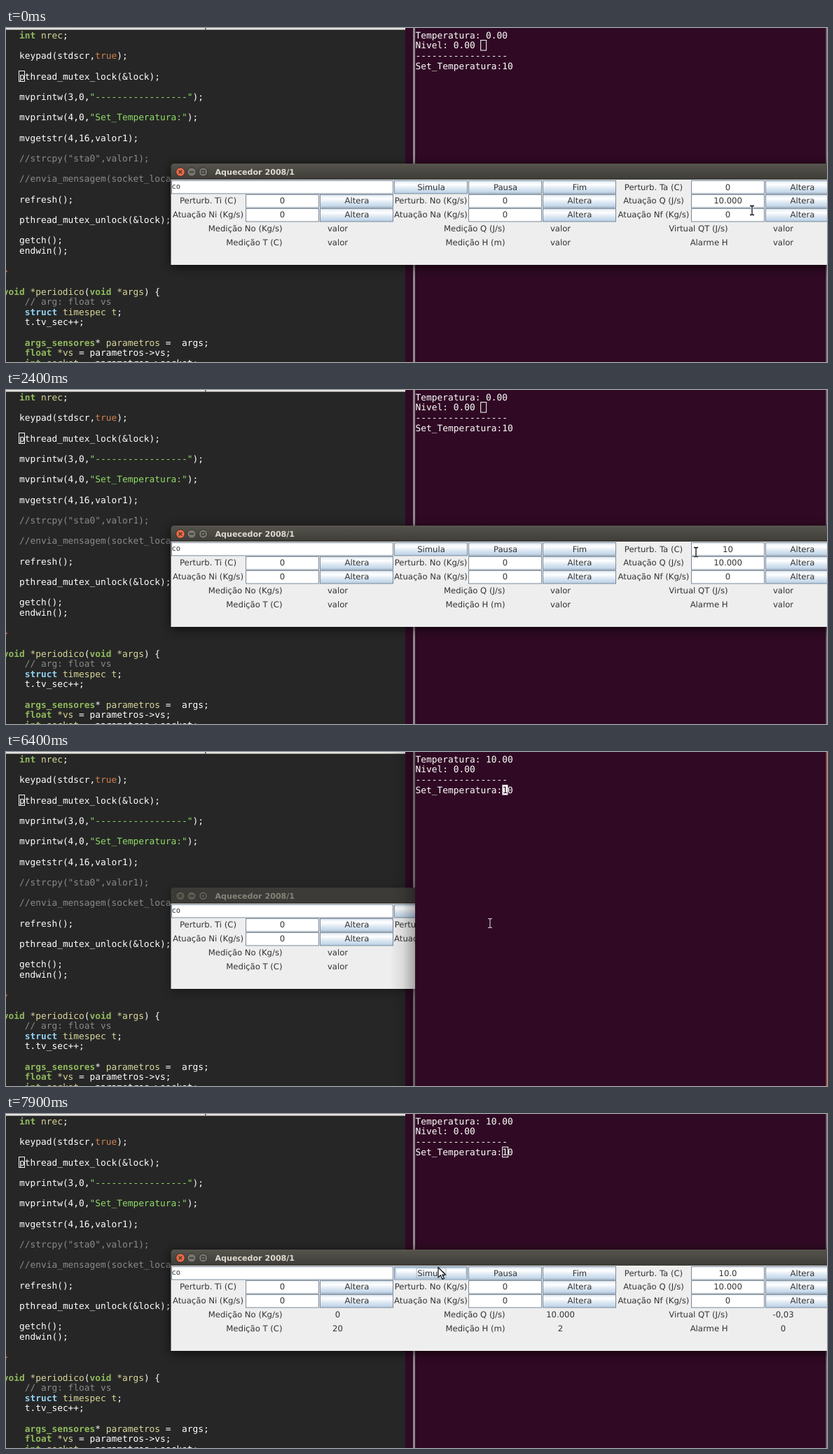
Write an HTML page that moves like this. It is 1172 px wide and 478 px high and loops after 8 s.

```html
<!DOCTYPE html>
<html lang="pt">
<head>
<meta charset="utf-8">
<style>
html, body { margin: 0; width: 100%; height: 100%; overflow: hidden; background: #300a24; }
svg { display: block; width: 1172px; height: 478px; }
text { white-space: pre; text-rendering: geometricPrecision; }
.mono { font: 12.85px "DejaVu Sans Mono", monospace; fill: #fff; }
.ui { font: 11.65px "DejaVu Sans", sans-serif; fill: #333; }
.title { font: bold 11.1px "DejaVu Sans", sans-serif; }
.k { fill: #8fb95c; font-weight: bold; }
.s { fill: #8fdc68; }
.c { fill: #8a8a8a; }
.o { fill: #cf8050; }
.y { fill: #d9d79a; }
.b { fill: #8fd0f0; font-weight: bold; }
</style>
</head>
<body>
<svg id="stage" viewBox="0 0 1172 478"></svg>
<script>
const LOOP = 8000, CHAR = 7.74, LINE = 14.66, COL = 106, ROW = 19.85;
const stage = document.getElementById('stage');

const rect = (x, y, w, h, fill, more = '') =>
  `<rect x="${x}" y="${y}" width="${w}" height="${h}" fill="${fill}" ${more}/>`;
const text = (x, y, s, cls = 'ui', more = '') => `<text x="${x}" y="${y}" class="${cls}" ${more}>${s}</text>`;
const outline = c => `stroke="${c}" stroke-width="1"`;

// line, column, code; {class|token} colours a token
const code = [
  [0, 3, '{k|int} {y|nrec};'],
  [2, 3, 'keypad(stdscr,{o|true});'],
  [4, 3, 'pthread_mutex_lock(&amp;lock);'],
  [6, 3, 'mvprintw(3,0,{s|"-----------------"});'],
  [8, 3, 'mvprintw(4,0,{s|"Set_Temperatura:"});'],
  [10, 3, 'mvgetstr(4,16,valor1);'],
  [12, 3, '{c|//strcpy("sta0",valor1);}'],
  [14, 3, '{c|//envia_mensagem(socket_local,}'],
  [16, 3, 'refresh();'],
  [18, 3, 'pthread_mutex_unlock(&amp;lock);'],
  [20, 3, 'getch();'],
  [21, 3, 'endwin();'],
  [23, 0, '{o|}}'],
  [25, 0, '{k|void} {y|*periodico}({k|void} {y|*args}) {'],
  [26, 4, '{c|// arg: float vs}'],
  [27, 4, '{b|struct} {y|timespec t};'],
  [28, 4, 't.tv_sec++;'],
  [30, 4, '{k|args_sensores}* {y|parametros} =  args;'],
  [31, 4, '{k|float} {y|*vs} = parametros->vs;'],
  [32, 4, '{k|int} {y|socket} = parametros->socket;']
];
const tint = s => s.replace(/\{(\w)\|(\}|[^}]*)\}/g, '<tspan class="$1">$2</tspan>');

const defs = `<defs>
  <linearGradient id="btn" x2="0" y2="1"><stop stop-color="#dde8f3"/><stop offset=".3" stop-color="#fff"/>
    <stop offset=".6" stop-color="#dde8f3"/><stop offset="1" stop-color="#b8cfe5"/></linearGradient>
  <linearGradient id="bar" x2="0" y2="1"><stop stop-color="#56544c"/><stop offset="1" stop-color="#3c3b37"/></linearGradient>
  <linearGradient id="shade"><stop stop-opacity="0"/><stop offset=".5" stop-opacity=".08"/>
    <stop offset="1" stop-opacity=".3"/></linearGradient>
  <filter id="blur" x="-20%" y="-50%" width="140%" height="200%"><feGaussianBlur stdDeviation="8"/></filter>
  <clipPath id="left"><path d="M0 0H584V478H0Z"/></clipPath></defs>`;

const editor = rect(0, 0, 570, 478, '#262626') + rect(0, 0, 570, 2.5, '#e6e4e0') + rect(284, 0, 1.5, 2.5, '#555') +
  code.map(([n, col, s]) => text((-4.2 + col * CHAR).toFixed(2), 15 + n * LINE, tint(s), 'mono')).join('') +
  rect(18.5, 61.5, 8, 15, 'none', outline('#f4f4f0'));

// time, x, y, shape: each position holds until the next one
const pointer = [
  [0, 1065, 261, 'beam'], [200, 1075, 256, 'beam'], [300, 1104, 246, 'arrow'], [400, 1128, 235, 'arrow'],
  [500, 1130, 231, 'arrow'], [600, 1124, 230, 'arrow'], [700, 1096, 229, 'arrow'], [800, 1069, 228, 'beam'],
  [900, 1053, 229, 'beam'], [1000, 1045, 230, 'beam'], [1100, 1015, 231, 'beam'], [1200, 985, 232, 'beam'],
  [4100, 891, 136, 'light'], [5000, 0, 0, ''], [5800, 913, 134, 'light'], [6000, 712, 249, 'light'],
  [6200, 695, 254, 'light'], [6400, 691, 245, 'light'], [6700, 617, 308, 'light'], [6900, 576, 325, 'arrow'],
  [7200, 561, 268, 'arrow'], [7400, 560, 240, 'arrow'], [7500, 559.5, 225.7, 'arrow'], [7900, 616.5, 219, 'arrow']
];
const beam = 'M-3 -6.5H-1L0 -5.5L1 -6.5H3M0 -5.5V5.5M-3 6.5H-1L0 5.5L1 6.5H3';
const shapes = {
  '': '',
  beam: `<path d="${beam}" fill="none" stroke="#fff" stroke-width="3"/><path d="${beam}" fill="none" stroke="#111" stroke-width="1.3"/>`,
  light: `<path d="${beam}" fill="none" stroke="#d5cdd2" stroke-width="1.1"/>`,
  arrow: '<path d="M.5 .5V15L4 11.8L6.5 17.4L8.9 16.3L6.5 11H11Z" fill="#fff" stroke="#111" stroke-width="1.2"/>'
};
function drawPointer(t) {
  const [, x, y, shape] = pointer.findLast(p => p[0] <= t);
  return `<g transform="translate(${x} ${y})">${shapes[shape]}</g>`;
}

const between = (t, a, b) => t >= a && t < b;
const colX = c => 236 + c * COL;
const rowY = r => Math.round(218 + r * ROW);
const baseline = r => 231.6 + r * ROW;
const middle = (x, r, s) => text(x, baseline(r), s, 'ui', 'text-anchor="middle"');
const label = (c, r, s) => middle(colX(c) + 52.5, r, s);
const field = (c, r, s, span = 1) =>
  rect(colX(c) + .5, rowY(r) + .5, span * COL - 2, 18.5, '#fff', outline('#7a8a99')) + label(c, r, s);

function button(c, r, s, { hover, pressed, focus } = {}) {
  const x = colX(c), y = rowY(r), half = s === 'Altera' ? 18 : 21;
  return rect(x + .5, y + .5, COL - 2, 18.5, pressed ? '#b8cfe5' : 'url(#btn)', outline('#7a8a99')) +
    (hover ? rect(x + 2, y + 2, COL - 5, 15.5, 'none', 'stroke="#b8cfe5" stroke-width="2"') : '') +
    (focus ? rect(x + 53 - half, y + 2.5, half * 2, 14.5, 'none', outline('#a3b8cc')) : '') +
    middle(x + 53, r, s);
}

function ambient(t) {
  if (t < 500) return '0';
  if (t < 1700) return '0.0';
  if (t < 1800) return '1';
  return t < 7700 ? '10' : '10.0';
}

function titleBar(active) {
  const line = active ? '#33322e' : '#2f2e2a', disc = active ? '#77756d' : '#5b5952';
  const circle = (x, fill) => `<circle cx="${x}" cy="206" r="6.3" fill="${fill}" ${outline('#2f2e2a')}/>`;
  return `<path d="M235.5 218V199Q235.5 194 240.5 194H1172V218Z" fill="${active ? 'url(#bar)' : '#3c3b37'}"/>` +
    circle(249, active ? '#ec6a45' : disc) + circle(265, disc) + circle(281.5, disc) +
    `<path d="M246.7 203.7L251.3 208.3M251.3 203.7L246.7 208.3M262 206H268M279.3 203.8H283.7V208.2H279.3Z" fill="none" stroke="${line}" stroke-width="1.3"/>` +
    text(298.5, 210.2, 'Aquecedor 2008/1', 'title', `fill="${active ? '#dfdbd2' : '#85827a'}"`);
}

function dialog(t, active) {
  const run = t >= 7700;
  const value = s => run ? s : 'valor';
  let out = rect(236, 198, 960, 143, '#000', `filter="url(#blur)" opacity="${active ? .75 : .4}"`) +
    titleBar(active) + rect(235.5, 217, 937, 122, '#eee');

  out += field(0, 0, '', 3) + text(236.6, 230, 'co', 'ui', 'style="font:10.4px DejaVu Sans Mono,monospace"');
  if (between(t, 200, 500)) out += rect(249, 221, 1, 14, '#333');
  out += button(3, 0, 'Simula', { hover: run, focus: run }) + button(4, 0, 'Pausa') + button(5, 0, 'Fim');
  out += label(6, 0, 'Perturb. Ta (C)') + field(7, 0, '');
  if (between(t, 1100, 1700)) out += rect(1020, 221, 20, 15, '#b8cfe5');
  out += label(7, 0, ambient(t));
  if (between(t, 1800, 2200) || between(t, 2300, 2400)) out += rect(1037, 221, 1, 15, '#333');
  out += button(8, 0, 'Altera', {
    hover: between(t, 300, 800), pressed: between(t, 500, 600), focus: between(t, 500, 1100)
  });

  [['Perturb. Ti (C)', 'Perturb. No (Kg/s)', 'Atuação Q (J/s)'],
   ['Atuação Ni (Kg/s)', 'Atuação Na (Kg/s)', 'Atuação Nf (Kg/s)']].forEach((names, r) =>
    names.forEach((s, i) => {
      out += label(i * 3, r + 1, s) + field(i * 3 + 1, r + 1, s.includes('Q') ? '10.000' : '0') +
        button(i * 3 + 2, r + 1, 'Altera');
    }));

  [[['Medição No (Kg/s)', '0'], ['Medição Q (J/s)', '10.000'], ['Virtual QT (J/s)', t < 7900 ? '10.000' : '-0,03']],
   [['Medição T (C)', '20'], ['Medição H (m)', '2'], ['Alarme H', '0']]].forEach((cells, r) =>
    cells.forEach(([s, v], i) => {
      const x = colX(i * 3) + 158.5;
      out += text(x, baseline(r + 3), s, 'ui', 'text-anchor="end"') + middle(x + 79, r + 3, value(v));
    }));
  return active ? out : `<g clip-path="url(#left)">${out}</g>`;
}

function terminal(t, focused) {
  const moved = t >= 5000;
  const x = 584.6 + (moved ? 16 : 12) * CHAR, y = moved ? 47.2 : 17.5;
  const lit = between(t, 4100, 4600) || between(t, 5000, 5600) || between(t, 6200, 6700) || between(t, 7400, 7700);
  const line = (n, s) => text(584.6, 14.6 + n * LINE, s, 'mono');
  let out = line(0, `Temperatura: ${t < 4100 ? '0.00' : '10.00'}`) + line(1, 'Nivel: 0.00') +
    line(2, '-'.repeat(17)) + line(3, 'Set_Temperatura:10');
  if (!focused) out += rect(x + .2, y, 8, 14.5, 'none', outline('#fff'));
  else if (lit) {
    out += rect(x, y - .3, 8, 14.6, '#fff');
    if (moved) out += text(x, 14.6 + 3 * LINE, '1', 'mono', 'style="fill:#300a24"');
  }
  return out;
}

function scene(t) {
  const focused = between(t, 4100, 7700);
  return defs + rect(0, 0, 1172, 478, '#300a24') + editor +
    rect(581, 0, 3, 478, '#918c8e') +
    rect(1170.5, 0, 1.5, 478, focused ? '#b0563c' : '#857d81') +
    terminal(t, focused) + dialog(t, !focused) +
    (focused ? rect(548, 0, 36, 478, 'url(#shade)') : '') + drawPointer(t);
}

let shown = '';
const start = performance.now();
function frame(now) {
  const next = scene(Math.max(0, now - start) % LOOP);
  if (next !== shown) stage.innerHTML = shown = next;
  requestAnimationFrame(frame);
}
frame(start);
</script>
</body>
</html>
```
